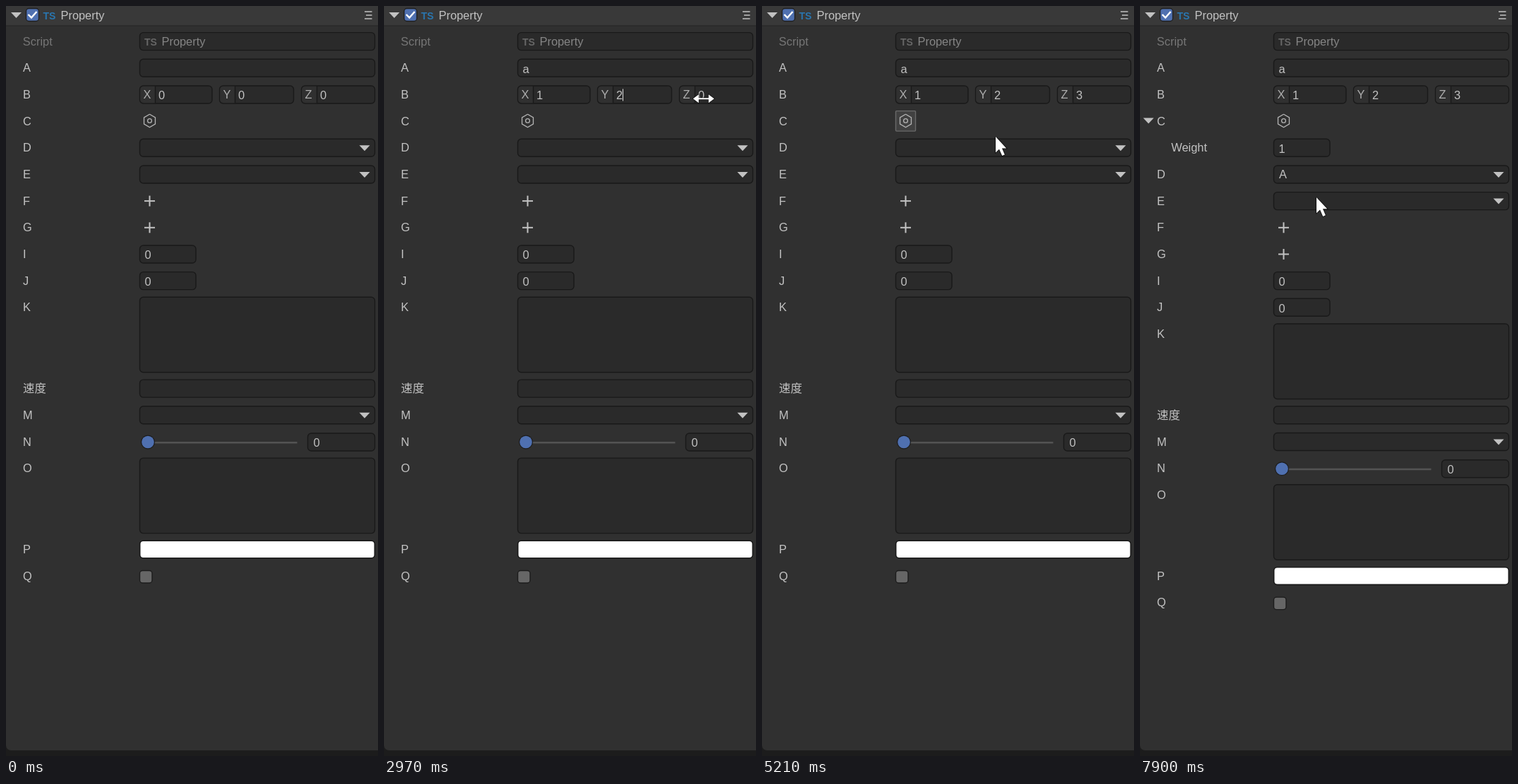
Recreate the animation shown at these times as an HTML page with a canvas. Size 527 by 1062 pixels, loop 8000 ms.

```html
<!DOCTYPE html>
<html lang="en">
<head>
<meta charset="utf-8">
<title>Property panel</title>
<style>
html, body { margin: 0; width: 100%; height: 100%; overflow: hidden; background: #303030; }
canvas { display: block; }
</style>
</head>
<body>
<canvas id="stage" width="527" height="1062"></canvas>
<script>
const g = document.getElementById('stage').getContext('2d');
const LOOP = 8000, PRESS = 100;
const ROW = 37.67, AREA = 114.8, TOP = 50.1;
const LEFT = 189.5, WIDE = 333, NARROW = 79.5;
const LIGHT = '#c2c2c2', EDGE = '#191919', FIELD = '#2a2a2a', BLUE = '#4f70b0';
const SANS = '"Liberation Sans", "Noto Sans CJK SC", "Noto Sans CJK", sans-serif';
const FONT = '16.4px ' + SANS, ICON = 'bold 14px ' + SANS;

const rowY = n => TOP + n * ROW;
const A = rowY(1), B = rowY(2), C = rowY(3), D = rowY(4);

const within = (v, a, b) => v >= a && v < b;

// Pointer script: each move may end with a named click
const moves = [], clicks = {};
function move(start, end, x, y, click) {
  moves.push({ start, end, x, y });
  if (click) clicks[click] = end;
}
move(0, 0, 437, 50);
move(190, 640, 209, A + 5, 'a');
move(760, 940, 243, A);
move(1330, 1690, 246, B - 3, 'x');
move(1950, 2320, 332, B - 6, 'y');
move(2650, 3030, 475, B + 8, 'z');
move(3300, 3900, 255, C + 16);
move(4050, 4460, 209, C + 1.5);
move(4600, 4600, 209, C + 1.5, 'create');
move(4870, 5210, 331, C + 22);
move(5350, 5930, 212.5, D - 2.5);
move(6160, 6160, 213, D - 2.5, 'weight');
move(6380, 6840, 254, D + ROW);
move(7030, 7060, 248, D + ROW + 2.5, 'open');
move(7300, 7500, 249, D + ROW + 26);
move(7640, 7640, 249, D + ROW + 26, 'choose');
move(7740, 7900, 250, D + ROW + 32.5);

const typed = { a: 1030, x: 1950, y: 2550, z: 3260, weight: 6370 };
const EXPAND = 5420, CLOSE = clicks.choose + 60;

function pointerAt(t) {
  let x, y;
  for (const m of moves) {
    if (t < m.start) break;
    const p = m.end > m.start ? Math.min(1, (t - m.start) / (m.end - m.start)) : 1;
    x = p < 1 ? x + (m.x - x) * p : m.x;
    y = p < 1 ? y + (m.y - y) * p : m.y;
  }
  return [x, y];
}

// Drawing helpers
function text(s, x, mid, color = LIGHT, font = FONT) {
  g.font = font;
  g.fillStyle = color;
  g.fillText(s, x, mid + 5.9);
}

function box(x, y, w, h, fill = FIELD, r = 5, stroke = EDGE) {
  g.beginPath();
  g.roundRect(x, y, w, h, r);
  g.fillStyle = fill;
  g.fill();
  if (!stroke) return;
  g.strokeStyle = stroke;
  g.lineWidth = 1.4;
  g.stroke();
}

function trace(points) {
  g.beginPath();
  points.forEach(([x, y]) => g.lineTo(x, y));
}

function shape(points, fill) {
  trace(points);
  g.fillStyle = fill;
  g.fill();
}

function line(points, color, width) {
  trace(points);
  g.strokeStyle = color;
  g.lineWidth = width;
  g.stroke();
}

function disc(x, y, r, fill) {
  g.beginPath();
  g.arc(x, y, r, 0, Math.PI * 2);
  g.fillStyle = fill;
  g.fill();
}

const triangle = (x, y) => shape([[x - 7.5, y - 4], [x + 7.5, y - 4], [x, y + 4]], LIGHT);

// Controls, each centred on the height of its row
function field(mid, x = LEFT, w = WIDE, fill) {
  box(x, mid - 12.5, w, 25, fill);
}

function value(s, x, mid, caret) {
  text(s, x, mid + 1);
  if (!caret) return;
  const end = Math.round(x + g.measureText(s).width) + 0.5;
  line([[end, mid - 8], [end, mid + 9]], '#e0e0e0', 1);
}

function number(mid, s = '0', caret = false) {
  field(mid, LEFT, NARROW);
  value(s, 196.5, mid, caret);
}

function select(mid, s = '', open = false) {
  field(mid, LEFT, WIDE, open ? '#434343' : FIELD);
  text(s, 197, mid);
  triangle(508, mid + 0.5);
}

function plus(mid) {
  const r = 7.5, x = 203.5;
  line([[x - r, mid], [x + r, mid]], LIGHT, 2);
  line([[x, mid - r], [x, mid + r]], LIGHT, 2);
}

const area = mid => box(LEFT, mid - 14.5, WIDE, AREA - 8.3);

function slider(mid) {
  line([[201, mid + 1.3], [412.5, mid + 1.3]], '#535353', 2.5);
  disc(201, mid + 0.6, 10, '#1d1d1d');
  disc(201, mid + 0.6, 8.8, BLUE);
  field(mid + 0.6, 427.5, 95);
  value('0', 435.5, mid);
}

function swatch(mid) {
  field(mid);
  box(LEFT + 1, mid - 11.5, WIDE - 2, 23, '#fff', 4, null);
}

const check = mid => box(LEFT, mid - 7.6, 17.5, 17.5, '#666', 4, '#1c1c1c');

const ROWS = { D: select, E: select, F: plus, G: plus, I: number, J: number, K: area,
  '速度': field, M: select, N: slider, O: area, P: swatch, Q: check };

function lowerRows(t, y) {
  for (const [name, control] of Object.entries(ROWS)) {
    text(name, 24, y - 0.3);
    if (name == 'D') select(y, t >= CLOSE ? 'A' : '', within(t, clicks.open, CLOSE));
    else control(y);
    y += control == area ? AREA : ROW;
  }
}

function axis(name, x, w, s, caret) {
  field(B, x, w);
  box(x + 0.7, B - 11.8, 21, 23.6, '#303030', [5, 0, 0, 5], null);
  line([[x + 22, B - 12], [x + 22, B + 12]], EDGE, 1.3);
  text(name, x + 5, B, '#adadad');
  value(s, x + 26.5, B, caret);
}

function hexagon(x, y) {
  const corners = [...Array(7).keys()].map(i => {
    const a = i * Math.PI / 3;
    return [x + 9.2 * Math.sin(a), y - 9.2 * Math.cos(a)];
  });
  line(corners, '#b4b4b4', 1.3);
  g.beginPath();
  g.arc(x, y, 2.9, 0, Math.PI * 2);
  g.stroke();
}

function header() {
  g.fillStyle = '#393939';
  g.fillRect(0, 0, 527, 27.5);
  g.fillStyle = '#292929';
  g.fillRect(0, 27.5, 527, 1.2);
  triangle(14.5, 13);
  box(28.5, 3.5, 18, 18, BLUE, 4, '#202020');
  line([[31.5, 12], [36, 16.5], [43.5, 8]], '#fff', 2.4);
  text('TS', 52.5, 13, '#2a75ae', ICON);
  text('Property', 77.5, 13);
  for (const d of [-5, 0, 5]) line([[d ? 508 : 510, 13 + d], [518.5, 13 + d]], LIGHT, 1.5);
  text('Script', 23.8, TOP - 0.4, '#767676');
  field(TOP);
  text('TS', 196, TOP, '#666', ICON);
  text('Property', 220.5, TOP - 0.4, '#858585');
}

function menu(y, hover) {
  const shade = g.createLinearGradient(0, y, 0, y + 20);
  shade.addColorStop(0, '#1c1c1c');
  shade.addColorStop(1, '#000');
  box(190, y, 332, 86, shade, [0, 0, 5, 5], '#262626');
  if (hover) box(194, y + 3, 324, 26, '#444', 3, null);
  ['A', 'B', 'C'].forEach((s, i) => text(s, 198, y + 15.8 + i * 25.5));
}

// Pointer shapes
function outlined(points, x, y) {
  const moved = points.map(([a, b]) => [x + a, y + b]);
  line([...moved, moved[0]], 'rgba(0,0,0,.65)', 1.6);
  shape(moved, '#fff');
}

function arrow(x, y) {
  outlined([[0, 0], [0, 22.3], [5, 17.6], [9.2, 27], [12.9, 25.3], [9, 16.3], [15.2, 16.3]], x, y);
}

function beam(x, y) {
  for (const [color, w] of [['rgba(0,0,0,.5)', 3.4], ['#fff', 2]]) {
    line([[x, y - 11], [x, y + 11]], color, w);
    for (const s of [-11, 11]) line([[x - 6, y + s], [x + 6, y + s]], color, w);
  }
}

function resize(x, y) {
  const half = [[-7, -1], [-7, -6], [-15, 0], [-7, 6], [-7, 1]];
  outlined([...half, ...half.map(([a, b]) => [-a, -b])], x, y);
}

function pointer(t, expanded) {
  const [x, y] = pointerAt(t);
  const overAxis = within(y, B - 12.5, B + 12.5);
  const overWeight = expanded && within(y, D - 12.5, D + 12.5) && x < LEFT + NARROW;
  const cursor = within(y, A - 12.5, A + 12.5) ? beam : overAxis || overWeight ? resize : arrow;
  // Hidden for a moment by the keystroke
  if (!within(t, typed.a, typed.a + 40)) cursor(x, y);
  if (Object.values(clicks).some(c => within(t, c, c + PRESS))) {
    disc(x, y, 16, 'rgba(255,255,0,.5)');
  }
}

function draw(t) {
  const expanded = t >= EXPAND;
  const entry = (key, before, after) => t >= typed[key] ? after : before;
  const focus = (key, end) => within(t, clicks[key], end);

  g.fillStyle = '#1c1c1c';
  g.fillRect(0, 0, 527, 1062);
  box(0, 0, 527, 1054, '#303030', [0, 0, 0, 7], null);
  header();

  text('A', 24, A - 0.5);
  field(A);
  value(entry('a', '', 'a'), 196.5, A, focus('a', clicks.x));

  text('B', 24, B - 0.3);
  axis('X', LEFT, 102.5, entry('x', '0', '1'), focus('x', clicks.y));
  axis('Y', 302.5, 105, entry('y', '0', '2'), focus('y', clicks.z));
  axis('Z', 418.5, 104, entry('z', '0', '3'), focus('z', 4100));

  text('C', 24, C - 0.4);
  if (within(t, 4400, EXPAND)) box(LEFT, C - 14.5, 28, 28.5, '#414141', 1, '#6a6a6a');
  hexagon(203.5, C - 0.6);
  if (expanded) {
    triangle(12, C - 0.5);
    text('Weight', 44.3, D - 0.3);
    number(D, entry('weight', '0', '1'), focus('weight', clicks.open));
  }

  lowerRows(t, expanded ? D + ROW : D);
  if (within(t, clicks.open, CLOSE)) menu(D + ROW + 12.5, t >= 7400);
  if (t >= 190) pointer(t, expanded);
}

const start = performance.now();
function tick() {
  draw((performance.now() - start) % LOOP);
  requestAnimationFrame(tick);
}
tick();
</script>
</body>
</html>
```
